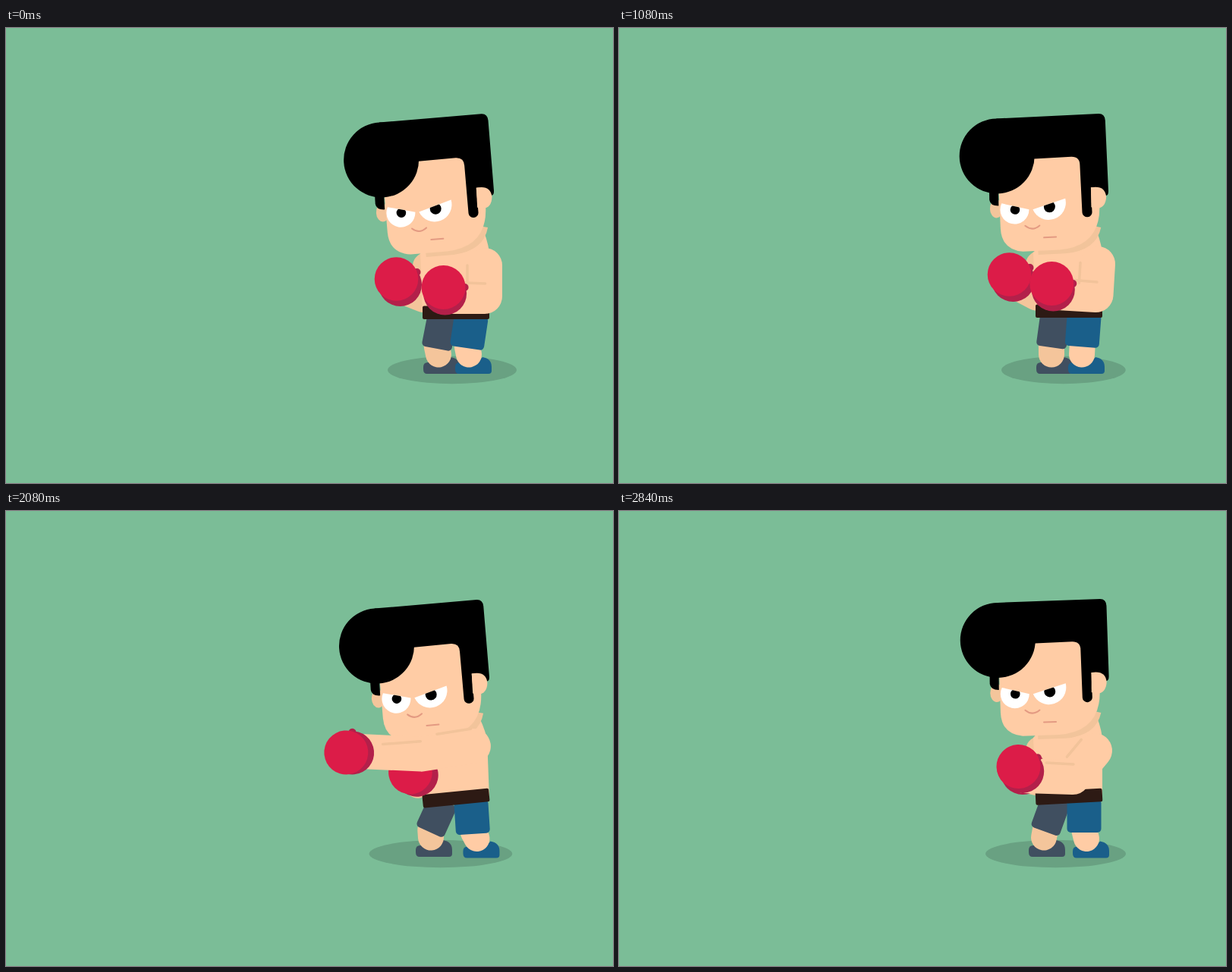
An HTML page that plays this animation: 800 by 600 pixels, repeating every 2.88 s.

```html
<!DOCTYPE html>
<html lang="en">
<head>
<meta charset="utf-8">
<title>Boxer</title>
<style>
  html, body { margin: 0; width: 100%; height: 100%; overflow: hidden; background: #7bbd97; }
  svg { display: block; width: 100vw; height: 100vh; }
  .skin { fill: #ffcca5; }
  .shade { fill: #f4c59b; }
  .limb { fill: none; stroke: #ffcca5; stroke-linecap: round; stroke-linejoin: round; }
  .far { stroke: #f4c59b; }
  .crease { fill: none; stroke: #f2c39a; stroke-width: 3.5; stroke-linecap: round; }
  .line { fill: none; stroke: #e39a82; stroke-width: 2; stroke-linecap: round; }
  .grey { fill: #404f60; }
  .blue { fill: #1a5f8a; }
  .dark { fill: #b3204a; }
  .red { fill: #dc1c48; }
</style>
</head>
<body>
<svg viewBox="0 0 800 600">
  <defs>
    <path id="shoe" d="M0 447Q0 441 6 441H30L36 434Q48 436 48 447V452Q48 456 44 456H5Q0 456 0 450Z"/>
    <path id="eyeL" d="M505 229L541 237.5A19 19 0 1 1 505 229Z"/>
    <path id="eyeR" d="M546 237.5L589 224A22.6 22.6 0 0 1 546 237.5Z"/>
    <clipPath id="clipL"><use href="#eyeL"/></clipPath>
    <clipPath id="clipR"><use href="#eyeR"/></clipPath>
  </defs>

  <ellipse id="shadow" fill="#69a182"/>

  <use id="farShoe" href="#shoe" class="grey"/>
  <path id="farCalf" class="limb far" stroke-width="34"/>
  <rect id="farThigh" class="grey" x="-20" y="-4" width="40" height="45" rx="5"/>
  <use id="nearShoe" href="#shoe" class="blue"/>
  <path id="nearCalf" class="limb" stroke-width="34"/>
  <rect id="nearThigh" class="blue" x="-23" y="-4" width="45" height="44" rx="5"/>

  <path id="farArm" class="limb far" stroke-width="36"/>
  <path id="torso" class="skin"/>
  <rect id="belt" x="-44" y="-9" width="88" height="17.5" rx="2" fill="#2d1a14"/>

  <g id="head">
    <path d="M552 293L588 292Q625 289 631 262" fill="none" stroke="#f2c49b" stroke-width="9"/>
    <ellipse cx="498" cy="236" rx="8.5" ry="12" class="shade"/>
    <path class="skin" d="M501 190L503 262Q504 290 532 293L580 291.5Q634 288 634 235L632 165H501Z"/>
    <path d="M489 205V224Q490 232 501 232V205Z"/>
    <path d="M500 117L635 113Q643 113 643.5 122L646 215Q646 222 641 221Q636 209 623 210L624 242A6.5 6.5 0 0 1 611 243L609 180Q609 169 598 169L549 171L500 200Z"/>
    <path class="skin" d="M623 210Q642 207 643 223Q642 237 630 238L623 236Z"/>
    <circle cx="500" cy="166.5" r="49.5"/>
    <use href="#eyeL" fill="#fff"/>
    <use href="#eyeR" fill="#fff"/>
    <circle cx="522.5" cy="237.5" r="6.3" clip-path="url(#clipL)"/>
    <circle cx="568" cy="234.5" r="7.5" clip-path="url(#clipR)"/>
    <path class="line" d="M535.5 259Q545 267 554.5 259"/>
    <path class="line" d="M560 275L576 274.5"/>
  </g>

  <g id="farGlove">
    <circle cx="27" cy="-9" r="5" class="dark"/>
    <circle cx="5" cy="7.5" r="28.5" class="dark"/>
    <circle r="28.8" class="red"/>
  </g>
  <path id="nearArm" class="limb" stroke-width="46"/>
  <path id="crease" class="crease"/>
  <g id="nearGlove">
    <circle cx="28" cy="0" r="5" class="dark"/>
    <circle cx="2" cy="8" r="28.5" class="dark"/>
    <circle r="29" class="red"/>
  </g>
</svg>

<script>
const LOOP = 2880, STEP = 40, PUNCH_START = 1920;
const parts = {};
document.querySelectorAll('svg > [id]').forEach(el => parts[el.id] = el);

// Guard stance: the body bobs every 480 ms, the arms sway every 960 ms.
function guard(t) {
  const bob = t / 480 * 2 * Math.PI, sway = bob / 2;
  const u = (1 + Math.cos(bob)) / 2, c = Math.cos(sway), s = Math.sin(sway);
  return {
    tilt: -4.13 * (u - .25), headX: 0, headY: 0,
    beltY: 371.5 + 4 * u, beltTilt: 0,
    farThigh: 4.5 + 6.5 * u, nearThigh: 8.5 * u,
    farFoot: 550, nearFoot: 592, footY: 0,
    shoulderX: 631, shoulderY: 309 + 4 * u,
    elbowX: 626 + 5 * u, elbowY: 350 + 4 * u,
    nearX: 564.8 + 16 * u - 4.2 * c + .7 * s,
    nearY: 324.5 + 19 * u - 1.5 * c + 5.8 * s, nearTurn: 0,
    farX: 518 - 1.5 * u - 2 * c - 1.9 * s,
    farY: 320.2 + 11.6 * u - .8 * c - .6 * s, farTurn: 0,
    farElbowX: 550, farElbowY: 352 + 5 * u,
    shadowL: 505 - 2 * u, shadowR: 665 + 8 * u - 1.3 * Math.sin(bob), shadowY: 451
  };
}

const ready = {
  tilt: -.4, headX: 0, headY: 3, beltY: 377, beltTilt: -3,
  farThigh: 20, nearThigh: 0, farFoot: 540, nearFoot: 598, footY: 1.5,
  shoulderX: 627, shoulderY: 316, elbowX: 598, elbowY: 351,
  nearX: 526.5, nearY: 337, nearTurn: -25,
  farX: 527, farY: 338, farTurn: 0, farElbowX: 550, farElbowY: 357,
  shadowL: 483, shadowR: 668, shadowY: 452
};
const lean = {
  ...ready, tilt: -4.2, headX: -8, headY: 4, beltY: 379.5, beltTilt: -6.5,
  farThigh: 26, nearThigh: -5, nearFoot: 604, shadowL: 477, shadowR: 667
};
const nearBack = {
  ...lean, shoulderX: 616, shoulderY: 308, elbowX: 570, elbowY: 308,
  nearX: 487, nearY: 313, nearTurn: -80,
  farX: 535, farY: 347, farTurn: -45, farElbowX: 575, farElbowY: 345
};
const nearHit = { ...nearBack, shoulderX: 612, elbowX: 530, elbowY: 310, nearX: 421, nearY: 312, nearTurn: -90 };
const farBack = { ...lean, shoulderX: 622, farX: 470, farY: 325, farTurn: -50, farElbowX: 530, farElbowY: 332 };
const farHit = { ...farBack, farX: 421, farY: 316, farTurn: -65, farElbowX: 495, farElbowY: 318 };

const keys = [
  [1920, guard(1920)], [2000, ready], [2120, nearHit], [2250, nearHit], [2320, nearBack],
  [2360, ready], [2480, ready], [2600, farHit], [2730, farHit], [2800, farBack], [2840, ready], [2880, ready]
];

function poseAt(t) {
  if (t < PUNCH_START) return guard(t);
  const i = keys.findIndex(key => key[0] > t);
  const [t0, from] = keys[i - 1], [t1, to] = keys[i];
  const x = (t - t0) / (t1 - t0), k = x * x * (3 - 2 * x);
  return Object.fromEntries(Object.keys(from).map(n => [n, from[n] + (to[n] - from[n]) * k]));
}

const set = (name, attrs) => {
  for (const a in attrs) parts[name].setAttribute(a, attrs[a]);
};
const place = (name, x, y, turn = 0) => set(name, { transform: `translate(${x} ${y}) rotate(${turn})` });
const polyline = (name, ...points) => set(name, { d: 'M' + points.join('L') });

function leg(side, hipX, hipY, turn, footX, footY, ankle) {
  const a = turn * Math.PI / 180;
  place(side + 'Thigh', hipX, hipY, turn);
  place(side + 'Shoe', footX, footY);
  polyline(side + 'Calf', [hipX - 38 * Math.sin(a), hipY + 38 * Math.cos(a)], [footX + ankle, 430.5 + footY]);
}

// A line beside a limb segment, on its front edge.
function edge([x0, y0], [x1, y1], gap, from, to) {
  const dx = x1 - x0, dy = y1 - y0, len = Math.hypot(dx, dy) || 1;
  const at = k => [x0 + dx * k - dy / len * gap, y0 + dy * k + dx / len * gap];
  return `M${at(from)}L${at(to)}`;
}

function draw(t) {
  const p = poseAt(t);
  const hipY = p.beltY + 7;
  set('shadow', {
    cx: (p.shadowL + p.shadowR) / 2, cy: p.shadowY, rx: (p.shadowR - p.shadowL) / 2, ry: 18.2
  });
  leg('far', 575, hipY, p.farThigh, p.farFoot, 0, 20);
  leg('near', 613.5, hipY, p.nearThigh, p.nearFoot, p.footY, 18);

  polyline('farArm', [554, p.beltY - 61.5], [p.farElbowX, p.farElbowY],
    p.farX < 500 ? [p.farX + 8, p.farY + 2] : [p.farX + 10, p.farY + 16]);
  const x = p.headX, y = p.headY;
  set('torso', {
    d: `M546 ${296 + y}L549 ${p.beltY}H637L${637 + x / 2} ${296 + y}Q${634 + x} ${275 + y} ${626 + x} ${262 + y}L560 ${280 + y}Z`
  });
  place('belt', 593, p.beltY, p.beltTilt);
  set('head', { transform: `translate(${x} ${y}) rotate(${p.tilt} 636 270)` });

  const shoulder = [p.shoulderX, p.shoulderY], elbow = [p.elbowX, p.elbowY];
  polyline('nearArm', shoulder, elbow, [p.nearX + 8, p.nearY + (p.nearTurn < -60 ? -2 : 12)]);
  set('crease', {
    d: edge(shoulder, elbow, 23, 0, .65) + edge(elbow, [p.nearX, p.nearY + 10], 17, 0, .5)
  });
  place('farGlove', p.farX, p.farY, p.farTurn);
  place('nearGlove', p.nearX, p.nearY, p.nearTurn);
}

const start = performance.now();
function tick() {
  const t = (performance.now() - start) % LOOP;
  draw(Math.floor(t / STEP) * STEP);
  requestAnimationFrame(tick);
}
tick();
</script>
</body>
</html>
```
